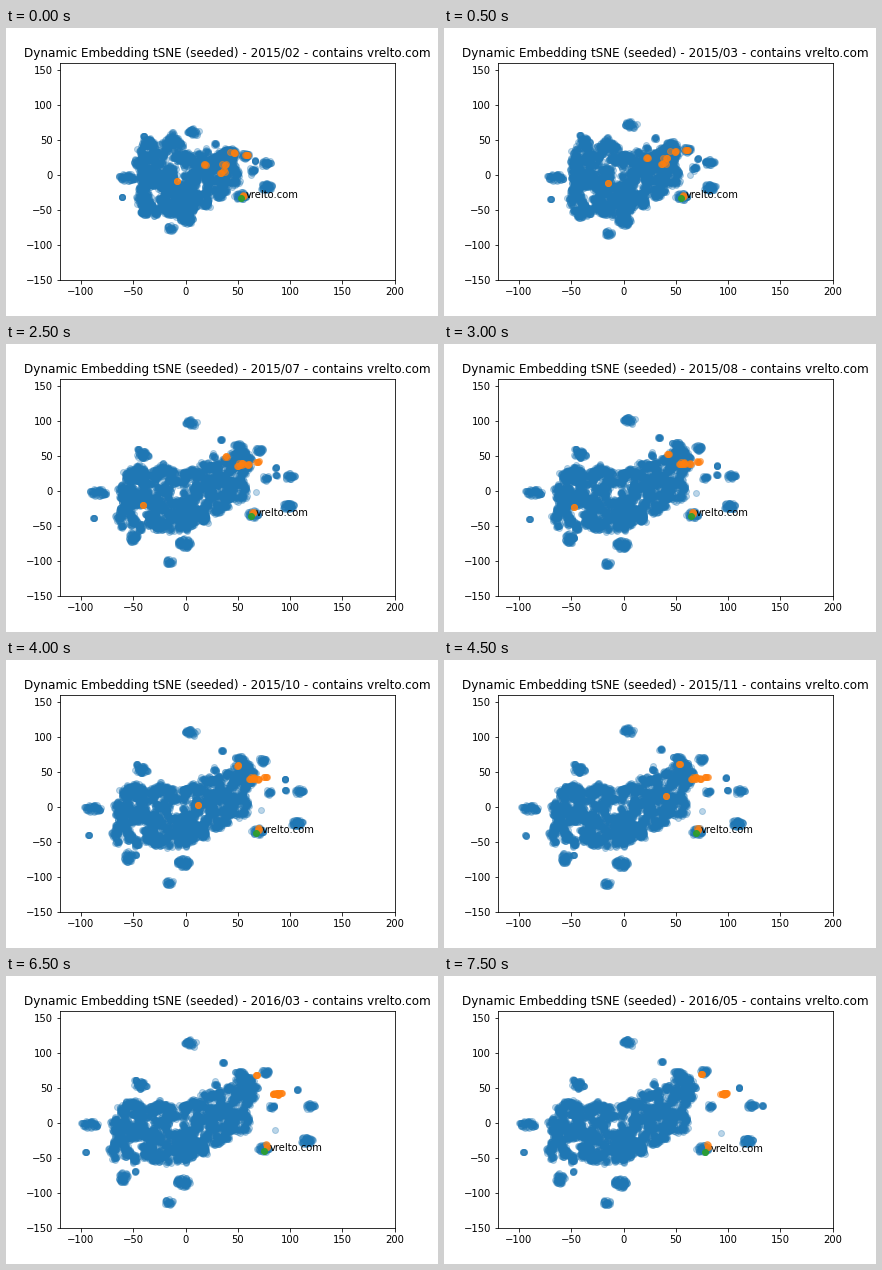
A matplotlib script for the animation above (8000 ms loop, 432x288 px).

```python
import numpy as np
import matplotlib.pyplot as plt
from matplotlib.animation import FuncAnimation

SITE = "vrelto.com"
MONTHS = 16
rng = np.random.default_rng(7)


def ease(m, pace):
    """0 to 1 over the loop; small pace slows down, negative speeds up."""
    pace = np.asarray(pace, float)
    return np.expm1(-m / pace) / np.expm1((1 - MONTHS) / pace)


def move(start, end, m, pace):
    start, end = np.asarray(start), np.asarray(end)
    return start + (end - start) * ease(m, pace)


def disc(n):
    r, a = np.sqrt(rng.random(n)), rng.random(n) * 2 * np.pi
    return np.column_stack([r * np.cos(a), r * np.sin(a)])


def group(start, end, size, end_size=None, n=None, pace=5):
    """Disc of points drifting from start to end."""
    n = n or 6 + int(1.2 * size[0] * size[1])
    unit = disc(n)
    unit[::9] *= 1.2
    return unit * size + start, unit * (end_size or size) + end, pace


def body(start, end, clumps=340, size=12, shrink=0.95, pace=4):
    """Clumps fixed inside an outline fan, so they follow it as it morphs."""
    start, end = np.array(start) * shrink, np.array(end) * shrink
    hub = np.array([0, -5])
    fan = end - hub
    after = np.roll(fan, -1, axis=0)
    area = np.abs(fan[:, 0] * after[:, 1] - fan[:, 1] * after[:, 0])
    i = rng.choice(len(fan), clumps, p=area / area.sum())
    r, s = np.sqrt(rng.random(clumps)), rng.random(clumps)
    shift = rng.normal(0, 1, (clumps * size, 2)) * [1.5, 2]

    def fill(outline):
        edge = outline - hub
        mix = edge[i].T * (1 - s) + edge[(i + 1) % len(edge)].T * s
        return np.repeat(hub + (mix * r).T, size, axis=0) + shift

    return fill(start), fill(end), pace


def place(groups, m):
    return np.vstack([move(a, b, m, pace) for a, b, pace in groups])


blue = [
    body([(52, -12), (52, 14), (50, 34), (43, 36), (32, 34), (17, 36),
          (0, 28), (-6, 56), (-24, 68), (-46, 50), (-48, 8), (-49, -12),
          (-45, -56), (10, -60), (35, -35)],
         [(62, -10), (64, 17), (73, 48), (67, 70), (46, 72), (24, 51),
          (2, 28), (-18, 27), (-40, 33), (-63, 32), (-79, 0), (-77, -25),
          (-74, -54), (9, -58), (30, -33)]),
    # top
    group((7, 61), (4, 115), (5.5, 5)),
    group((28, 44), (36, 87), (1.5, 2)),
    group((43, 33), (52, 70), (6, 5), pace=3),
    group((57, 28), (77, 74), (4, 5)),
    group((66, 20), (110, 50), (1, 1), pace=15),
    group((-36, 46), (-43, 54), (6, 6)),
    group((-40, 55), (-48, 61), (1, 1)),
    group((-45, 18), (-54, 27), (6, 5)),
    # left
    group((-56, -4), (-92, -2), (8, 5.5), pace=3.5),
    group((-61, -32), (-96, -42), (0.7, 0.7), pace=3.5),
    # bottom
    group((-14, -76), (-16, -114), (4, 4)),
    group((1, -63), (-3, -86), (7, 7), pace=9),
    group((-38, -50), (-61, -79), (4.5, 8), pace=9),
    group((-42, -54), (-48, -69), (0.8, 0.8), pace=3),
    # right
    group((77, 17), (122, 25), (5, 4.5), pace=10),
    group((77, -17), (118, -26), (6.5, 5), pace=10),
    group((53, -30), (76, -37), (5.5, 6), pace=10),
    group((64, 7), (83, 24), (3, 4)),
    group((77, 17), (133, 25), (1, 1), pace=(-9, 5)),
    group((62, 0), (93, -14), (0.2, 0.2), n=1, pace=-9),
]

orange = [
    group((36, 9), (96, 42), (5, 8), (3.5, 1.2), n=10, pace=(-25, 2.5)),
    group((45, 32), (95, 41), (3, 1), n=5, pace=(-25, 5)),
    group((58.5, 28), (97, 42), (2, 1), n=5, pace=(-25, 1.5)),
    group((18, 16), (74.5, 70), (2, 3), (0.5, 0.5), n=4, pace=(60, 6)),
    group((55, -30), (80, -33), (0.6, 1), (1, 3), n=4, pace=40),
]

# one highlighted point crosses the body
STOPS = [0, 6, 9, 11, 13]
ROAMER = [(-8, -9), (-47, -23), (41, 15), (41, 11), (69, 63)]


def roamer(m):
    return [[np.interp(m, STOPS, axis) for axis in zip(*ROAMER)]] * 3


fig, ax = plt.subplots(figsize=(6, 4), dpi=72)
fig.subplots_adjust(left=0.125, right=0.9, bottom=0.125, top=0.88)
ax.set_xlim(-120, 200)
ax.set_ylim(-150, 160)
title = ax.set_title("")
all_dots = ax.scatter([], [], s=36, color="C0", alpha=0.3)
near_dots = ax.scatter([], [], s=36, color="C1", alpha=0.5)
site_dot = ax.scatter([], [], s=36, color="C2", alpha=0.9)
label = ax.text(0, 0, SITE, size=10)


def update(m):
    year, month = divmod(m + 1, 12)
    title.set_text(f"Dynamic Embedding tSNE (seeded) - "
                   f"{2015 + year}/{month + 1:02d} - contains {SITE}")
    x, y = move((52.8, -32.4), (78, -41.2), m, 40)
    all_dots.set_offsets(place(blue, m))
    near = place(orange, m)
    if m < STOPS[-1]:
        near = np.vstack([near, roamer(m)])
    near_dots.set_offsets(near)
    site_dot.set_offsets([[x, y]])
    label.set_position((x + 5, y))
    return all_dots, near_dots, site_dot, label, title


anim = FuncAnimation(fig, update, frames=MONTHS, interval=500,
                     repeat=True, repeat_delay=0, blit=False)
plt.show()
```
